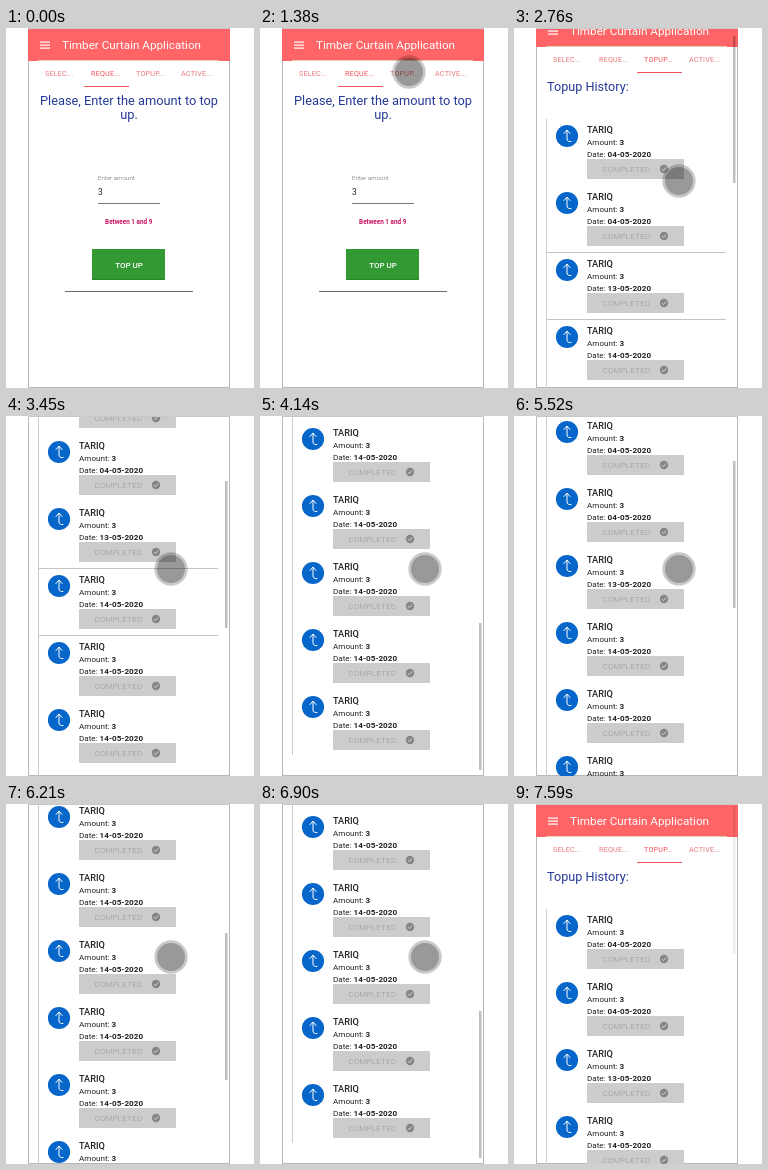
Animation of 248 by 360 pixels, one loop 8000 ms. Source, as an HTML page with a canvas:

```html
<!DOCTYPE html>
<html lang="en">
<head>
<meta charset="utf-8">
<title>Top up</title>
<style>
html, body { margin: 0; width: 100%; height: 100%; overflow: hidden; background: #fff; }
canvas { display: block; width: 248px; height: 360px; }
</style>
</head>
<body>
<canvas id="stage"></canvas>
<script>
const W = 248, H = 360, LOOP = 8000, STEP = 690;
const canvas = document.getElementById('stage');
const ratio = window.devicePixelRatio || 1;
canvas.width = W * ratio;
canvas.height = H * ratio;
const ctx = canvas.getContext('2d');

const PINK = '#ff6466', RED = '#f4525a', NAVY = '#253a97', GREY = '#cccccc', EDGE = '#b8b8b8';
const ROWS = 11, PITCH = 67, LIST_TOP = 105, LIST_END = 840;
const DATES = ['04', '04', '13'];
const TABS = [['SELEC...', 39], ['REQUE...', 85], ['TOPUP...', 130], ['ACTIVE...', 175]];

// The screen changes in held steps; rules are the dividers visible at that scroll,
// bar is the opacity of the scrollbar.
const HOLD = [165, 153];
const steps = [
  { page: 'form' },
  { page: 'form', touch: [209, 178] },
  { page: 'form', touch: [149, 44] },
  { page: 'list', scroll: 0, bar: 0, rules: [] },
  { page: 'list', scroll: 14, touch: HOLD, bar: 0.25, rules: [2, 3] },
  { page: 'list', scroll: 153, touch: HOLD, bar: 0.25, rules: [3, 4] },
  { page: 'list', scroll: 501, touch: HOLD, bar: 0.25, rules: [] },
  { page: 'list', scroll: 8.5, touch: HOLD, bar: 0.25, rules: [2, 3] },
  { page: 'list', scroll: 106, touch: HOLD, bar: 0.25, rules: [] },
  { page: 'list', scroll: 310, touch: HOLD, bar: 0.25, rules: [] },
  { page: 'list', scroll: 501, touch: HOLD, bar: 0.25, rules: [] },
  { page: 'list', scroll: 0, bar: 0.08, rules: [] }
];

function rect(x, y, w, h, color) {
  ctx.fillStyle = color;
  ctx.fillRect(x, y, w, h);
}

function disc(x, y, r, color) {
  ctx.fillStyle = color;
  ctx.beginPath();
  ctx.arc(x, y, r, 0, Math.PI * 2);
  ctx.fill();
}

function text(str, x, y, size, color, weight = 400, align = 'left', spacing = 0) {
  ctx.font = `${weight} ${size}px Roboto, sans-serif`;
  ctx.letterSpacing = spacing + 'px';
  ctx.textAlign = align;
  ctx.fillStyle = color;
  ctx.fillText(str, x, y);
  return ctx.measureText(str).width;
}

function stroke(points, color, width) {
  ctx.strokeStyle = color;
  ctx.lineWidth = width;
  ctx.lineCap = ctx.lineJoin = 'round';
  ctx.beginPath();
  points.forEach(([x, y], i) => i ? ctx.lineTo(x, y) : ctx.moveTo(x, y));
  ctx.stroke();
}

function header(active) {
  rect(22, 0, 202, 33, PINK);
  rect(32, 32, 181, 1, '#e3cdb4');
  for (let i = 0; i < 3; i++) rect(34, 13.5 + i * 3, 10, 1.2, '#fff');
  text('Timber Curtain Application', 56, 21, 11.7, '#fff');
  TABS.forEach(([label, x], i) =>
    text(label, x, 48, 7.2, i === active ? RED : '#ea777c', 400, 'left', 0.2));
  rect(78 + (active - 1) * 45, 58, 45, 1, RED);
}

function form() {
  header(1);
  text('Please, Enter the amount to top', 123, 77, 12.8, NAVY, 400, 'center');
  text('up.', 123, 91, 12.8, NAVY, 400, 'center');
  text('Enter amount', 92, 151.5, 6.2, '#666', 300);
  text('3', 92, 167, 8.5, '#222');
  rect(92, 175, 62, 1, '#777');
  text('Between 1 and 9', 122.7, 196, 6.35, '#cc1460', 700, 'center');
  rect(86, 221, 73, 31, '#339933');
  rect(86, 251, 73, 1, '#2b862b');
  text('TOP UP', 123, 239.5, 8, '#fff', 500, 'center');
  rect(59, 263, 128, 1, '#6a6a6a');
}

function arrowIcon(x, y) {
  disc(x, y, 11.1, '#0766c9');
  stroke([[x - 3, y - 2.5], [x, y - 6], [x + 3, y - 2.5]], '#fff', 1);
  ctx.beginPath();
  ctx.moveTo(x, y - 5.5);
  ctx.lineTo(x, y + 3);
  ctx.quadraticCurveTo(x, y + 6, x + 4, y + 5.5);
  ctx.stroke();
}

function row(i, y) {
  arrowIcon(53, y);
  text('TARIQ', 73, y - 3, 9.2, '#222', 500);
  const lines = [['Amount: ', '3', 9], ['Date: ', (DATES[i] || '14') + '-05-2020', 21]];
  for (const [label, value, dy] of lines) {
    const w = text(label, 73, y + dy, 8.1, '#222');
    text(value, 73 + w, y + dy, 8.1, '#222', 600);
  }
  const top = Math.round(y + 23.3);
  rect(73, top, 97, 20, GREY);
  text('COMPLETED', 88.5, top + 12.7, 7.6, '#959595', 300, 'left', 0.5);
  disc(150, top + 10, 4.2, '#858585');
  stroke([[148, top + 10.2], [149.4, top + 11.6], [152, top + 8.7]], '#ddd', 0.9);
}

function list({ scroll, rules, bar }) {
  ctx.save();
  ctx.translate(0, -scroll);
  header(2);
  text('Topup History:', 33, 77, 12.65, NAVY);
  ctx.restore();

  const top = Math.round(LIST_TOP - scroll);
  rect(32, top, 1, LIST_END - LIST_TOP, GREY);
  for (const r of rules) {
    rect(33, Math.floor(LIST_TOP - 1 + r * PITCH - scroll), 179, 1, '#c4c4c4');
  }
  for (let i = 0; i < ROWS; i++) {
    const y = 122 + i * PITCH - scroll;
    if (y > -46 && y < H + 14) row(i, y);
  }
  rect(219, Math.round(2 + scroll * 0.409), 2.5, 147, `rgba(0,0,0,${bar})`);
}

function touchMark([x, y]) {
  disc(x, y, 16.7, 'rgba(0,0,0,.21)');
  disc(x, y, 14, 'rgba(0,0,0,.24)');
}

function draw(now) {
  const step = steps[Math.floor((now % LOOP) / STEP)];
  ctx.setTransform(ratio, 0, 0, ratio, 0, 0);
  rect(0, 0, W, H, '#fff');
  rect(22, 0, 1, H, EDGE);
  rect(223, 0, 1, H, EDGE);
  rect(22, 359, 202, 1, EDGE);
  if (step.page === 'form') form();
  else list(step);
  rect(22, 0, 202, 1, '#c8c8c8');
  if (step.touch) touchMark(step.touch);
}

const start = performance.now();
function tick() {
  draw(performance.now() - start);
  requestAnimationFrame(tick);
}
tick();
</script>
</body>
</html>
```
